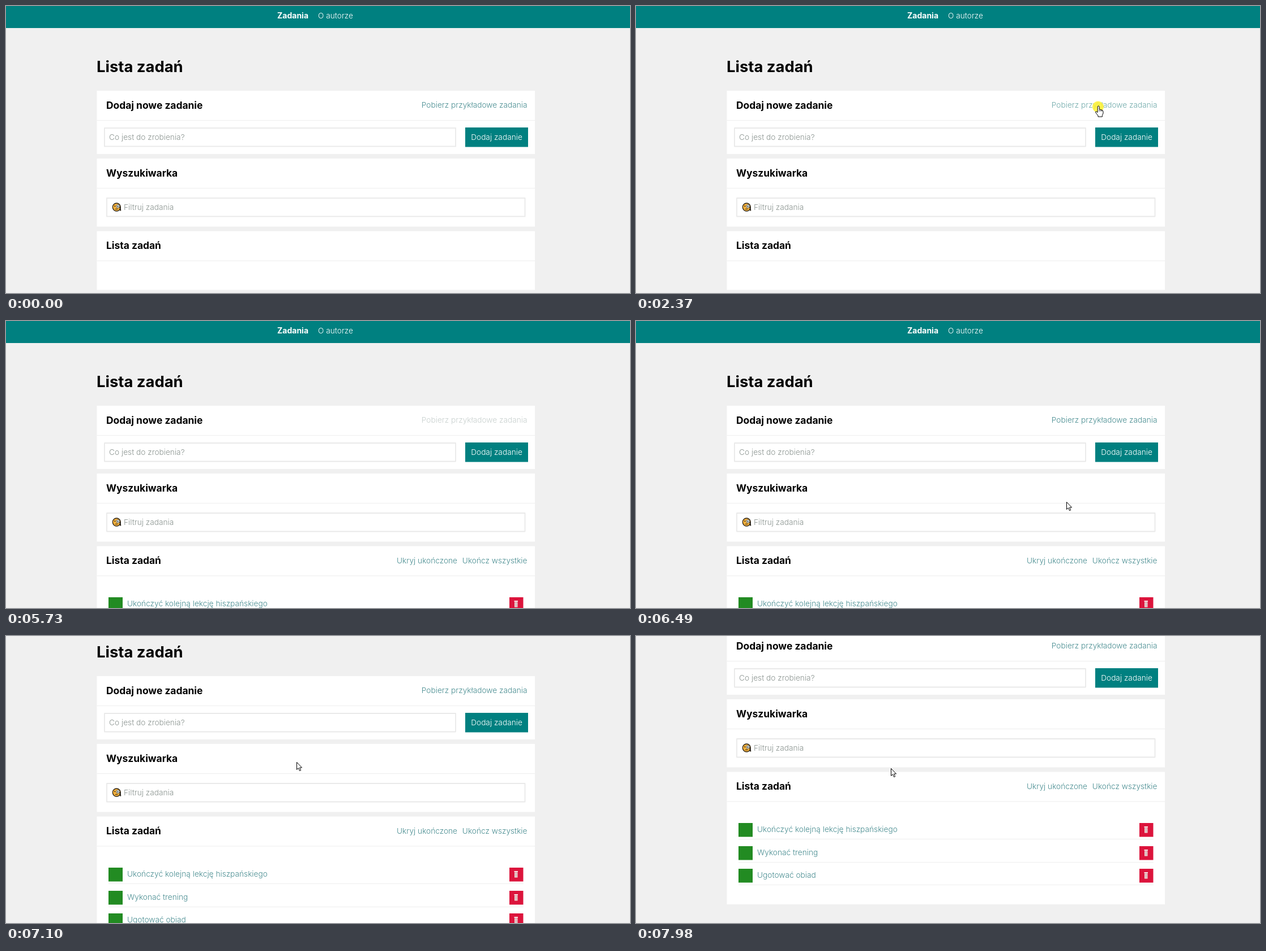
An HTML page with a canvas that plays this animation: 1102x508 px, repeating every 8 s.

```html
<!DOCTYPE html>
<html lang="pl">
<head>
<meta charset="utf-8">
<title>Lista zadań</title>
<style>
  html, body { margin: 0; width: 100%; height: 100%; overflow: hidden; background: #f0f0f0; }
  canvas { display: block; }
</style>
</head>
<body>
<canvas id="stage" width="1102" height="508"></canvas>
<script>
const ctx = document.getElementById('stage').getContext('2d');
const LOOP = 8000, STEP = 70;
const LOADING = 2580, LOADED = 5730;

const FONT = {
  title: '700 27.4px Inter, sans-serif',
  heading: '700 17.4px Inter, sans-serif',
  navBold: '700 14px Inter, sans-serif',
  body: '300 13.7px Inter, sans-serif'
};
const TEAL = '#008080', GREY = '#8b9490', LINE = '#eeeeee', LINK = '#478c90';
const TASKS = ['Ukończyć kolejną lekcję hiszpańskiego', 'Wykonać trening', 'Ugotować obiad'];

// Bursts of movement; inside each one the picture advances in even steps.
const BURSTS = [0, 640, 1470, 2370, 3190, 5730, 6560, 6960, 7430, 7910];

// Tracks: [time, ...values]
const SCROLL = [[6890, 0], [6960, 5], [7030, 44], [7100, 79], [7170, 86],
  [7500, 86], [7570, 124], [7640, 152], [7710, 158]];
const LINK_COLOR = [[1830, 71, 140, 144], [2170, 112, 170, 170], [LOADING, 112, 170, 170],
  [3080, 216, 218, 217], [LOADED, 200, 208, 206], [6230, 71, 140, 144]];
const BUTTON_COLOR = [[1500, 0, 128, 128], [1650, 0, 150, 150], [1750, 0, 150, 150], [1960, 0, 128, 128]];
const POINTER = [
  [[640, 1015, 470], [780, 980, 418], [990, 931, 345], [1200, 890, 295], [1400, 868, 269],
    [1470, 865, 262], [1610, 850, 235], [1820, 820, 190], [2030, 816, 178], [2170, 816, 177],
    [2720, 816, 177], [3120, 815, 194], [3190, 805, 197], [3330, 672, 220], [3470, 577, 260],
    [3540, 640, 310], [3610, 820, 385], [3670, 1070, 480], [3725, 1070, 480]],
  [[6110, 1040, 440], [6250, 900, 380], [6430, 760, 320], [6600, 640, 262], [6750, 550, 230],
    [6890, 513, 223], [7100, 513, 223], [7170, 511, 222], [7500, 511, 222], [7710, 507, 217],
    [7840, 507, 217], [7910, 480, 227], [7980, 450, 234], [8000, 450, 234]]
];

function at(track, t) {
  if (t <= track[0][0]) return track[0].slice(1);
  for (let i = 1; i < track.length; i++) {
    const a = track[i - 1], b = track[i];
    if (t < b[0]) {
      const k = (t - a[0]) / (b[0] - a[0]);
      return a.slice(1).map((v, j) => v + (b[j + 1] - v) * k);
    }
  }
  return track[track.length - 1].slice(1);
}

const rgb = c => `rgb(${c.map(Math.round).join(',')})`;

function rect(x, y, w, h, color) {
  ctx.fillStyle = color;
  ctx.fillRect(x, y, w, h);
}

function text(str, x, y, font, color, align = 'left') {
  ctx.font = font;
  ctx.fillStyle = color;
  ctx.textAlign = align;
  ctx.fillText(str, x, y);
}

function circle(x, y, r, fill, stroke, width = 1) {
  ctx.beginPath();
  ctx.arc(x, y, r, 0, Math.PI * 2);
  if (fill) { ctx.fillStyle = fill; ctx.fill(); }
  if (stroke) { ctx.strokeStyle = stroke; ctx.lineWidth = width; ctx.stroke(); }
}

function panel(y, h, title) {
  rect(160.5, y, 773.5, h, '#ffffff');
  rect(160.5, y + 52, 773.5, 1, LINE);
  text(title, 177, y + 31.5, FONT.heading, '#000');
}

function input(x, y, w, h) {
  ctx.strokeStyle = '#e9e9e9';
  ctx.lineWidth = 1.8;
  ctx.strokeRect(x + 1, y + 1, w - 2, h - 2);
}

function monocleFace(x, y) {
  circle(x, y, 7, '#f6b13a', '#2b2419', 1.3);
  circle(x - 3.2, y - 1.8, 1, '#3a2a14');
  circle(x + 2.4, y - 1.4, 3, '#cfe3ee', '#6b5a44', 1);
  circle(x + 2.2, y - 1.2, 1, '#3a2a14');
  ctx.strokeStyle = '#2b2419';
  ctx.lineWidth = 1.1;
  ctx.beginPath();
  ctx.moveTo(x - 2.5, y + 3.8);
  ctx.quadraticCurveTo(x, y + 2.8, x + 2, y + 3.8);
  ctx.stroke();
  ctx.lineWidth = 2;
  ctx.beginPath();
  ctx.moveTo(x + 6, y - 1);
  ctx.lineTo(x + 7, y + 6.5);
  ctx.stroke();
}

function bin(x, y) {
  rect(x, y, 24.5, 24.5, '#dc143c');
  rect(x + 8.5, y + 6, 6.5, 2, '#f6e3e3');
  rect(x + 9, y + 8.5, 5.5, 9, '#f3dede');
  for (const dx of [10.4, 12.5]) rect(x + dx, y + 9.5, 0.8, 7, '#b98a8a');
}

function taskList() {
  text('Ukryj ukończone', 797, 429, FONT.body, LINK, 'right');
  text('Ukończ wszystkie', 920.5, 429, FONT.body, LINK, 'right');
  TASKS.forEach((name, i) => {
    const y = Math.round(489 + i * 40.5);
    rect(181, y, 25, 24.5, '#228b22');
    text(name, 214, y + 16, FONT.body, LINK);
    bin(889, y);
    rect(181, y + 28, 733, 1, LINE);
  });
}

function page(t, loaded) {
  rect(0, 0, 1102, 39, TEAL);
  text('Zadania', 479, 21.5, FONT.navBold, '#fff');
  text('O autorze', 551, 21.5, FONT.body, '#fff');
  text('Lista zadań', 160, 117, FONT.title, '#000');

  panel(150, 112, 'Dodaj nowe zadanie');
  const busy = t >= LOADING && !loaded;
  text(busy ? 'Ładowanie...' : 'Pobierz przykładowe zadania', 920.5, 179.5,
    FONT.body, rgb(at(LINK_COLOR, t)), 'right');
  input(173, 215, 622, 34.5);
  text('Co jest do zrobienia?', 182, 236.5, FONT.body, GREY);
  rect(811, 215, 111, 34.5, rgb(at(BUTTON_COLOR, t)));
  text('Dodaj zadanie', 866.5, 236.5, FONT.body, '#fff', 'center');

  panel(270, 120.5, 'Wyszukiwarka');
  input(177, 339, 740.5, 34.5);
  monocleFace(195.3, 356);
  text('Filtruj zadania', 208, 361, FONT.body, GREY);

  panel(398.5, loaded ? 234.5 : 104, 'Lista zadań');
  if (loaded) taskList();
}

function outline(points, x, y) {
  ctx.beginPath();
  points.forEach(([px, py]) => ctx.lineTo(x + px, y + py));
  ctx.closePath();
  ctx.fillStyle = '#fff';
  ctx.strokeStyle = '#000';
  ctx.lineWidth = 1;
  ctx.lineJoin = 'round';
  ctx.fill();
  ctx.stroke();
}

function arrow(x, y) {
  outline([[0.5, 0.5], [0.5, 13.5], [3.4, 10.8], [5.6, 15.6], [7.7, 14.7], [5.6, 10], [9.6, 10]], x, y);
}

function hand(x, y) {
  outline([[-0.8, 1], [0.2, 0], [1.4, 0.2], [2.2, 1.2], [2.2, 6], [4.4, 6.2], [5, 7], [6.8, 7],
    [7.4, 8], [8.4, 8.2], [9, 9.4], [9, 13], [7.4, 16.5], [7.4, 19], [0, 19], [0, 17],
    [-4, 12], [-4.5, 10.2], [-3, 9.6], [-0.8, 11.4]], x, y);
  ctx.beginPath();
  for (const dx of [2.2, 4.8, 7]) {
    ctx.moveTo(x + dx, y + 6.6);
    ctx.lineTo(x + dx, y + 9.6);
  }
  ctx.lineWidth = 0.8;
  ctx.stroke();
}

function beam(x, y) {
  rect(x - 0.5, y - 6, 1, 13, '#222');
  for (const dy of [-7, 6]) {
    rect(x - 3, y + dy, 2.5, 1, '#222');
    rect(x + 0.5, y + dy, 2.5, 1, '#222');
  }
}

const inside = (x, y, l, t, r, b) => x >= l && x <= r && y >= t && y <= b;

function pointer(t, scroll, loaded) {
  const track = POINTER.find(p => t >= p[0][0] && t < p[p.length - 1][0]);
  if (!track) return;
  const [x, y] = at(track, t).map(Math.round);
  const py = y + scroll;
  if (t >= 2370 && t < 2510) circle(816, 178.5, 10, 'rgba(255,242,40,0.82)');

  const onLink = inside(x, py, 732, 168, 920, 184) && (t < LOADING || loaded);
  const onAction = loaded && inside(x, py, 688, 416, 920, 433);
  const onButton = inside(x, py, 811, 215, 922, 249);
  const onInput = inside(x, py, 173, 215, 795, 249) || inside(x, py, 177, 339, 917, 373);
  if (onLink || onAction || onButton) hand(x, y);
  else if (onInput) beam(x, y);
  else arrow(x, y);
}

function draw(time) {
  const start = BURSTS.filter(b => b <= time).pop();
  const t = start + Math.floor((time - start) / STEP) * STEP;
  const scroll = Math.round(at(SCROLL, t)[0]);
  const loaded = t >= LOADED;
  rect(0, 0, 1102, 508, '#f0f0f0');
  ctx.save();
  ctx.translate(0, -scroll);
  page(t, loaded);
  ctx.restore();
  pointer(t, scroll, loaded);
}

const begin = performance.now();
function tick() {
  draw((performance.now() - begin) % LOOP);
  requestAnimationFrame(tick);
}
tick();
</script>
</body>
</html>
```
